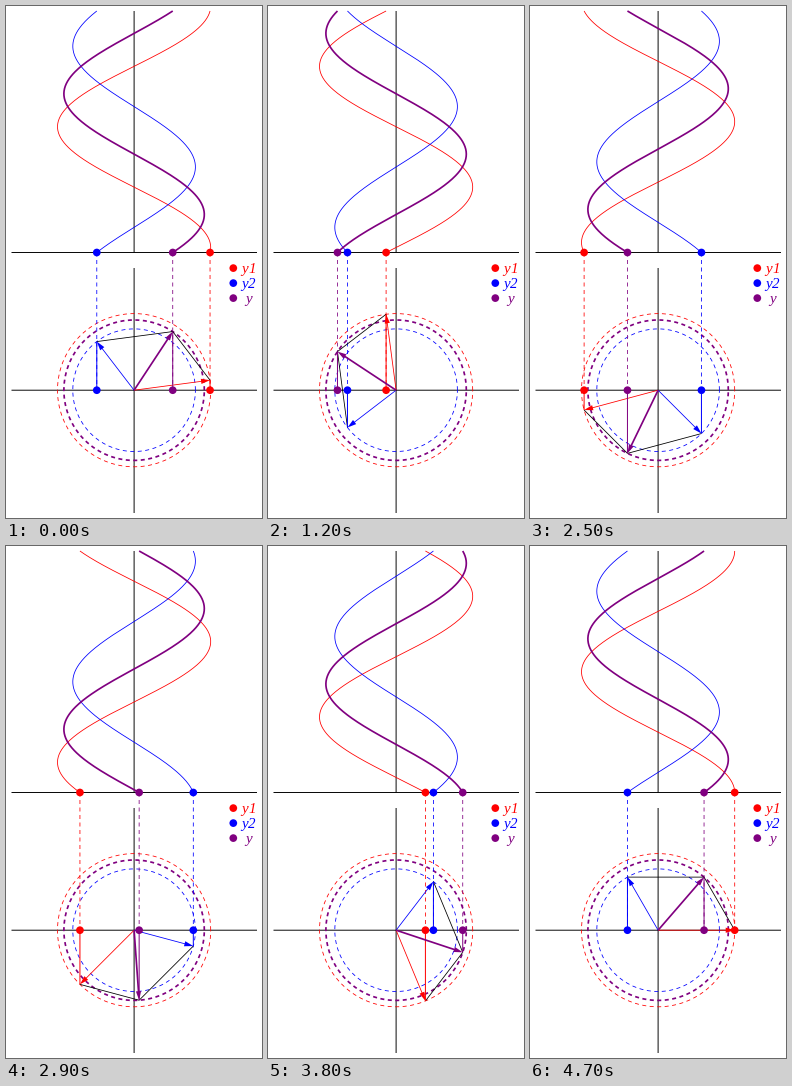
Recreate the animation shown at these times as a matplotlib script. Size 256x512 px, loop 4800 ms.

```python
import numpy as np
import matplotlib.pyplot as plt
from matplotlib.animation import FuncAnimation
from matplotlib.patches import Circle, Polygon

plt.rcParams["path.snap"] = False

W, H, DPI = 256, 512, 64
PX = 72 / DPI                      # points per pixel
STEPS, INTERVAL = 48, 100
CX, CY = 128.1, 384.2              # centre of the phasor diagram
TOP, BASE = 5, 246.5               # vertical extent of the wave plot
R1, R2, LEAD = 76.6, 61.3, 2 * np.pi / 3
RED, BLUE, PURPLE = "#ff0000", "#0000ff", "#800080"
THIN, THICK = 0.8, 1.7
DASH = (4, 3.5)

lead = R2 * np.exp(1j * LEAD)
PHASORS = [(R1 + 0j, RED, THIN), (lead, BLUE, THIN), (R1 + lead, PURPLE, THICK)]

fig = plt.figure(figsize=(W / DPI, H / DPI), dpi=DPI, facecolor="white")
ax = fig.add_axes([0, 0, 1, 1])
ax.set_xlim(0, W)
ax.set_ylim(H, 0)
ax.axis("off")


def line(xs, ys, color, width=THIN, z=2, dash=None):
    art, = ax.plot(xs, ys, color=color, lw=width * PX, zorder=z,
                   solid_capstyle="butt", dash_capstyle="butt")
    if dash:
        art.set_dashes([d / width for d in dash])
    return art


def dot(x, y, color, z=8):
    return ax.add_patch(Circle((x, y), 3.85, fc=color, ec="none", zorder=z))


def to_screen(z):
    z = np.atleast_1d(z)
    return np.column_stack([CX + z.real, CY - z.imag])


def head_points(tip, angle):
    """Corners of a slim arrowhead in screen coordinates."""
    return to_screen(tip + np.exp(1j * angle) * np.array([0, -9 + 2.6j, -9 - 2.6j]))


# Axes
for y in (BASE, CY):
    line([5.5, 251], [y, y], "black", 0.95, z=1)
for y0, y1 in ((TOP, BASE), (262, 507)):
    line([CX, CX], [y0, y1], "black", 0.95, z=1)

# Circles swept by each phasor
turn = np.linspace(0, 2 * np.pi, 361)
for z0, color, width in PHASORS:
    ring = to_screen(abs(z0) * np.exp(1j * turn))
    line(ring[:, 0], ring[:, 1], color, width, dash=DASH)

# Legend, letters set on a fixed pitch
for y, (_, color, _), label in zip((262, 277, 292), PHASORS, ("y1", "y2", "y")):
    dot(227.3, y + 0.1, color)
    for j, letter in enumerate(label):
        ax.text(242.3 + 7.8 * (j - (len(label) - 1) / 2), y + 4.6, letter,
                color=color, ha="center", va="baseline",
                family="Liberation Serif", style="italic", size=15 * PX)

# Moving parts
wave_y = np.linspace(TOP, BASE, 300)
lag = 2 * np.pi * (BASE - wave_y) / (BASE - TOP)
sides = [line([], [], "black", z=4) for _ in range(2)]
parts = []
for i, (_, color, width) in enumerate(PHASORS):
    z = 5 + 0.2 * i
    parts.append(dict(
        wave=line([], [], color, width, z=z),
        drop=line([], [], color, z=3, dash=DASH),
        leg=line([], [], color, 1.0, z=z),
        shaft=line([], [], color, width, z=z),
        head=ax.add_patch(Polygon(np.zeros((3, 2)), fc=color, ec="none",
                                  zorder=z)),
        dots=[dot(0, y, color, 8 + 0.1 * i) for y in (BASE, CY)],
    ))


def update(k):
    theta = 2 * np.pi * (k + 1) / STEPS
    tips = [z0 * np.exp(1j * theta) for z0, _, _ in PHASORS]

    for part, tip in zip(parts, tips):
        angle = np.angle(tip)
        x, y = to_screen(tip)[0]
        end = to_screen(tip * (1 - 4 / abs(tip)))[0]
        part["wave"].set_data(CX + abs(tip) * np.cos(angle - lag), wave_y)
        part["drop"].set_data([x, x], [BASE, CY])
        part["leg"].set_data([x, x], [CY, y])
        part["shaft"].set_data([CX, end[0]], [CY, end[1]])
        part["head"].set_xy(head_points(tip, angle))
        for d in part["dots"]:
            d.center = (x, d.center[1])

    corner = to_screen(tips[2])[0]
    for side, tip in zip(sides, tips):
        x, y = to_screen(tip)[0]
        side.set_data([x, corner[0]], [y, corner[1]])
    return []


anim = FuncAnimation(fig, update, frames=STEPS, interval=INTERVAL,
                     init_func=lambda: update(0), repeat=True, repeat_delay=0,
                     blit=False)
plt.show()
```
